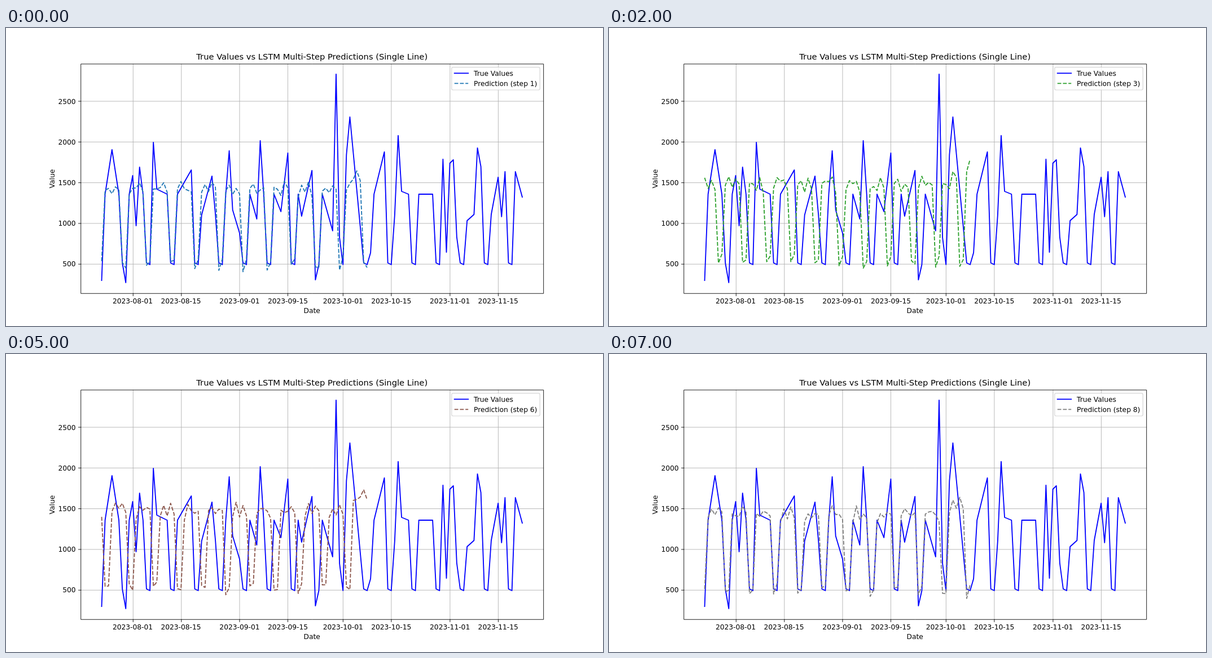
Animation, 1058 px wide and 529 px high, one loop 8000 ms. Source, as an HTML page with a canvas:

```html
<!DOCTYPE html>
<html lang="en">
<head>
<meta charset="utf-8">
<title>Forecast chart</title>
<style>
  html, body { margin: 0; width: 100%; height: 100%; overflow: hidden; background: #fff; }
  canvas { display: block; width: 1058px; height: 529px; }
</style>
</head>
<body>
<canvas id="chart" width="1058" height="529"></canvas>
<script>
const ctx = document.getElementById('chart').getContext('2d');
const DOT = 1058 / 1200;
const POINT = DOT * 100 / 72;
const STEP_MS = 1000;
const DAYS = 123;
const FORECAST_DAYS = 78;
const GRID = '#b0b0b0';
const COLORS = ['#1f77b4', '#ff7f0e', '#2ca02c', '#d62728',
                '#9467bd', '#8c564b', '#e377c2', '#7f7f7f'];

const dayX = i => 169.5 + i * 6.11;
const valueY = v => 490.5 - v * 0.1442;
// Centre thin lines on the 1200-dot grid of the figure
const snap = v => (Math.round(v / DOT) + 0.5) * DOT;

const left = snap(132.25), right = snap(952.2);
const top_ = snap(63.5), bottom = snap(470.8);

const xTicks = [
  [9, '2023-08-01'], [23, '2023-08-15'], [40, '2023-09-01'], [54, '2023-09-15'],
  [70, '2023-10-01'], [84, '2023-10-15'], [101, '2023-11-01'], [115, '2023-11-15']
];
const yTicks = [500, 1000, 1500, 2000, 2500];

const range = (n, fn) => Array.from({ length: n }, (_, i) => fn(i));

// Seeded noise in -1..1
function noise(n) {
  const v = Math.sin(n * 12.9898 + 4.1) * 43758.5453;
  return (v - Math.floor(v)) * 2 - 1;
}

// Ordinary week, Sunday first: only Monday, Friday and the weekend are fixed
const WEEK = { 0: 420, 1: 295, 5: 295, 6: 417 };

// Notable days: [day, height on stage]
const EVENTS = new Map([
  [0, 448], [3, 216], [7, 452], [9, 262], [10, 351], [11, 247],
  [15, 203], [16, 286], [26, 252], [29, 332], [32, 263], [33, 331],
  [37, 218], [38, 323], [40, 364], [45, 339], [46, 200], [52, 326],
  [54, 222], [58, 334], [61, 253], [62, 447], [67, 360], [68, 82],
  [69, 372], [71, 225], [72, 158], [75, 352], [78, 399], [79, 295],
  [82, 220], [85, 332], [86, 191], [87, 290], [99, 233], [100, 398],
  [101, 240], [102, 234], [103, 371], [106, 342], [108, 331], [109, 213],
  [110, 246], [113, 331], [115, 265], [116, 335], [117, 255], [120, 255], [122, 300]
]);

// Straight lines join the fixed days, so the rest need no points
const actual = range(DAYS, i => [dayX(i), EVENTS.get(i) ?? WEEK[i % 7]])
  .filter(([, y]) => y !== undefined);

// Every step runs the same weekly pattern one day earlier
const PATTERN = [411, 286, 274, 283, 274, 285, 419];

function forecast(step) {
  const lift = 5 * Math.cos(step * 2 * Math.PI / 7);
  return range(FORECAST_DAYS, i => {
    const day = (i + step) % 7;
    const weekend = day === 0 || day === 6;
    const surge = weekend ? 0 : Math.max(0, i - 70) * 5;
    return [dayX(i), PATTERN[day] + lift - surge + 10 * noise(i + step * 100)];
  });
}

const forecasts = COLORS.map((_, step) => forecast(step));

function line(points, color, width, dash = []) {
  ctx.strokeStyle = color;
  ctx.lineWidth = width;
  ctx.lineJoin = 'round';
  ctx.lineCap = dash.length ? 'butt' : 'square';
  ctx.setLineDash(dash);
  ctx.beginPath();
  points.forEach(([x, y]) => ctx.lineTo(x, y));
  ctx.stroke();
  ctx.setLineDash([]);
}

function text(str, x, y, align = 'center', size = 10) {
  ctx.font = `${size * POINT}px "DejaVu Sans", sans-serif`;
  ctx.textAlign = align;
  ctx.fillStyle = '#000';
  ctx.fillText(str, x, y);
}

const thick = 1.5 * POINT;
const dashes = [3.7 * thick, 1.6 * thick];

function drawGrid() {
  const tick = 3.5 * POINT;
  for (const [day, label] of xTicks) {
    const x = snap(dayX(day));
    line([[x, top_], [x, bottom]], GRID, DOT);
    line([[x, bottom], [x, bottom + tick]], '#000', DOT);
    text(label, dayX(day), 489.2);
  }
  for (const v of yTicks) {
    const y = snap(valueY(v));
    line([[left, y], [right, y]], GRID, DOT);
    line([[left - tick, y], [left, y]], '#000', DOT);
    text(v, 123.6, valueY(v) + 4.6, 'right');
  }
}

function drawLabels() {
  text('True Values vs LSTM Multi-Step Predictions (Single Line)', 542.2, 56.2, 'center', 12);
  text('Date', 542.2, 506);
  ctx.save();
  ctx.translate(85.5, 267.6);
  ctx.rotate(-Math.PI / 2);
  text('Value', 0, 0);
  ctx.restore();
}

function drawLegend(step) {
  const x = 789.8;
  ctx.beginPath();
  ctx.roundRect(x, 69.7, 946.2 - x, 40.3, 2.4);
  ctx.fillStyle = 'rgba(255,255,255,0.8)';
  ctx.fill();
  ctx.strokeStyle = 'rgba(204,204,204,0.8)';
  ctx.lineWidth = POINT;
  ctx.stroke();
  const row = (y, label, color, dash) => {
    line([[x + 4.9, y], [x + 29.4, y]], color, thick, dash);
    text(label, x + 39.2, y + 4.2, 'left');
  };
  row(80.3, 'True Values', '#00f');
  row(98.4, `Prediction (step ${step + 1})`, COLORS[step], dashes);
}

function draw(step) {
  ctx.fillStyle = '#fff';
  ctx.fillRect(0, 0, 1058, 529);
  drawGrid();
  line(actual, '#00f', thick);
  line(forecasts[step], COLORS[step], thick, dashes);
  ctx.strokeStyle = '#000';
  ctx.lineWidth = DOT;
  ctx.strokeRect(left, top_, right - left, bottom - top_);
  drawLabels();
  drawLegend(step);
}

const start = performance.now();
let shown = -1;
function tick() {
  const step = Math.floor((performance.now() - start) / STEP_MS) % COLORS.length;
  if (step !== shown) draw(shown = step);
  requestAnimationFrame(tick);
}
tick();
</script>
</body>
</html>
```
